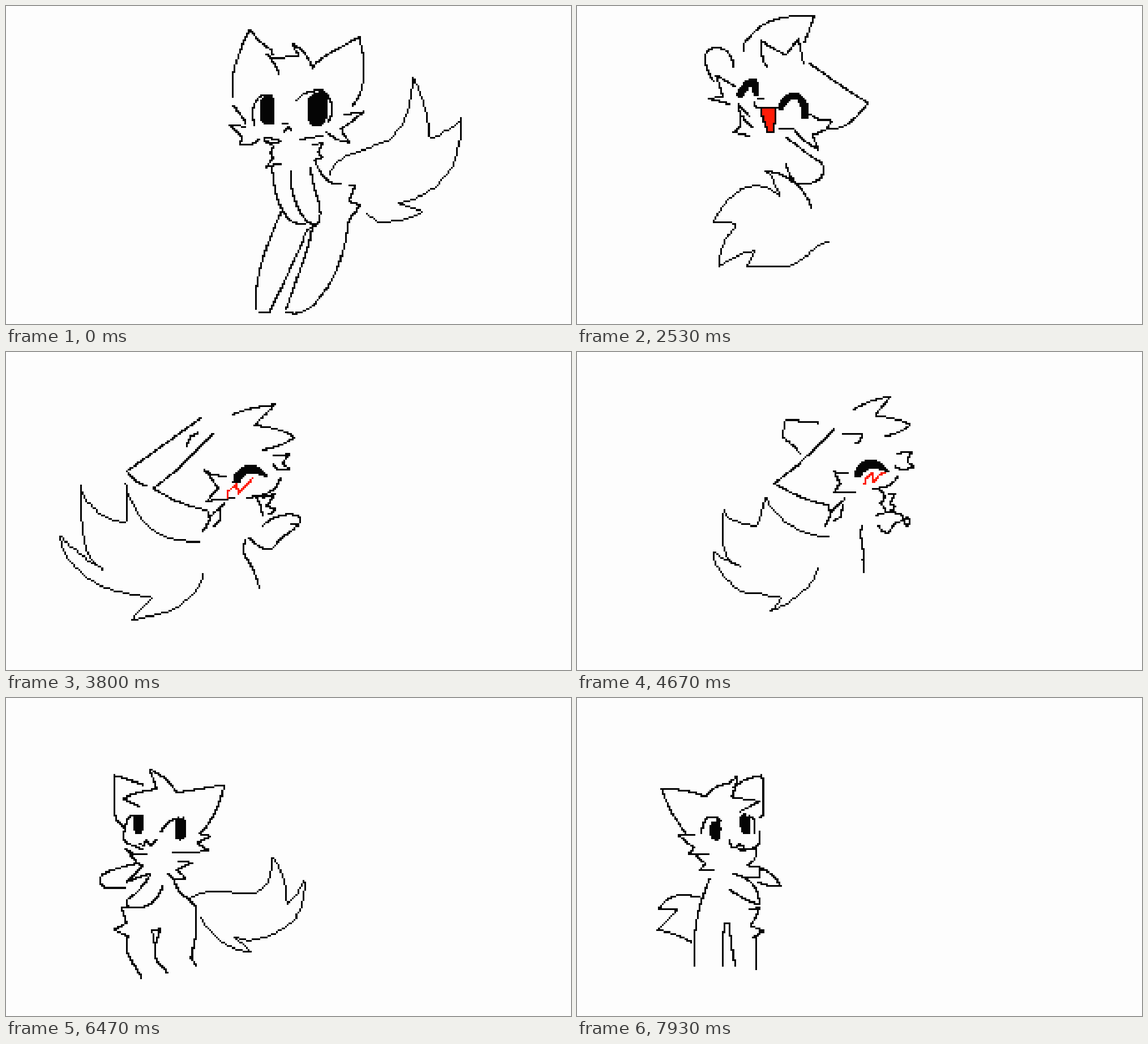
Recreate the animation shown at these times as an HTML page with a canvas. Size 998x561 px, loop 8 s.

```html
<!DOCTYPE html>
<html lang="en">
<head>
<meta charset="utf-8">
<title>Dancing cat</title>
<style>
html, body { margin: 0; width: 100%; height: 100%; overflow: hidden; background: #fdfdfd; }
canvas { display: block; width: 100vw; height: 100vh; image-rendering: pixelated; }
</style>
</head>
<body>
<canvas id="stage" width="320" height="180"></canvas>
<script>
const ctx = document.getElementById('stage').getContext('2d');
const PIXEL = 998 / 320, STEPS = 120, LOOP = 8000, SAMPLES = 160;
const BLACK = '#050505', RED = '#ff1c08', PINK = '#ffaab0';

// Strokes are split by ";". "~" marks a curve control point.
// Prefix: # black fill, r red line, R outlined red fill, p pink fill.
const watching = {
  earL: '402,162 401,125 ~407,85 431,42 447,62 468,77 471,86;402,176 424,206',
  earR: '542,110 548,100 572,83 624,55 632,92 632,125 ~628,158 613,175',
  hair: '460,86 467,91 514,90 516,86 506,67 ~532,80 542,110;462,86 474,101 482,119',
  cheekL: '424,213 394,210 409,223 417,231 412,246 431,246 447,236',
  cheekR: '597,192 632,187 606,207 592,217 596,227 608,241 585,236 567,224',
  whiskers: '457,231 485,238;519,236 560,228',
  eyeL: '439,209 434,190 ~440,158 459,156 470,156;#458,161 470,161 474,168 474,196 471,207 458,208 450,200 450,170',
  eyeR: '514,166 526,154 550,148 563,150 574,170 574,195 568,204;#545,154 560,152 567,160 566,195 560,208 545,212 536,203 536,165',
  mouth: '492,222 499,215 504,219;489,207 497,207',
  chest: '457,237 472,247 467,260 473,268 466,276 459,284 485,278;541,245 560,242 552,258 559,268 544,272;459,240 482,243',
  arms: '470,284 ~474,340 490,362 ~500,382 515,384 528,384;503,292 ~502,335 524,371 ~535,385 545,387;538,285 ~542,320 552,345 ~560,375 548,386 540,390',
  body: '545,272 ~560,308 575,312 592,314',
  hip: '606,315 617,318 609,336 606,345 626,351 608,375',
  legs: '487,362 ~450,440 442,500 442,535;449,540 465,540 ~500,470 524,416 ~528,395 540,391;541,391 535,420 ~515,480 495,535;495,542 512,543 ~535,538 545,525 ~590,480 603,395 606,376',
  tail: '572,297 576,285 600,265 ~670,240 678,235 ~715,205 719,127 ~745,175 748,233 ~780,225 803,199 ~805,240 790,280 ~760,335 693,348 737,363 ~700,382 658,382 638,368'
};
const winking = {
  earL: '290,190 274,180 ~240,140 240,88 245,86 247,90 346,90',
  earR: '395,86 410,82 518,67 ~516,115 500,148 ~492,162 482,166',
  hair: '346,90 403,44 399,80 395,86;442,80 ~436,108 414,114',
  cheekL: '311,205 284,207 309,222 298,244 325,229',
  cheekR: '455,170 488,161 466,191 487,206 438,210',
  whiskers: '340,222 362,226;411,215 440,208;342,229 374,235;413,224 438,211',
  eyeL: '#316,192 322,204 338,208 352,205 361,192 356,208 340,213 324,211',
  eyeR: '428,160 462,149;#402,170 412,165 432,160 432,195 420,201 408,196 402,186;446,160 446,184',
  mouth: '366,211 370,218 378,217 384,212 390,219 398,213;392,198 400,198',
  chest: '343,232 354,245 362,256 344,271 374,267;438,211 440,225 430,239 441,243 453,250 417,252',
  arms: '378,286 ~420,345 440,366 452,367 457,353;420,276 ~445,330 457,353;447,276 ~462,305 461,350',
  hip: '371,346 348,325 337,316 343,335 353,360 325,382 353,389',
  legs: '347,391 ~340,420 340,445 ~347,500 360,535 380,552;397,550 402,392 424,375;407,392 410,460 ~416,520 433,546;456,402 460,470 464,546 457,547',
  tail: '326,391 ~260,395 240,412 ~220,428 198,451 ~220,465 248,471 236,485 236,521 ~270,505 288,502 299,518 ~310,490 338,452'
};
const laughing = {
  earL: '294,79 296,66 ~320,30 360,21 ~385,16 419,17 402,65',
  earR: '410,101 480,150 514,171 ~490,205 465,215 443,216',
  hair: '335,107 328,95 325,62 369,87 391,58 398,90 400,101',
  cheekL: '278,141 246,122 257,160 233,164 271,173',
  cheekR: '411,191 425,200 450,203 440,218 416,228 426,253 ~400,240 384,218 358,216',
  whiskers: '284,173 304,195;292,195 310,215',
  eyeL: '#282,158 ~298,128 312,128 ~322,135 321,158 313,157 ~310,138 305,140 290,161',
  eyeR: '#354,180 ~365,155 388,153 ~410,165 408,198 398,198 ~400,170 385,162 ~370,165 361,184',
  mouth: '313,169 316,178 345,178;321,163 329,163;R324,180 350,180 351,195 347,222 336,222 329,200',
  chest: '284,176 290,195 290,210 277,223 304,229',
  arms: '370,231 ~410,265 432,277 ~440,290 430,304 ~420,316 386,312 ~372,295 370,278;241,132 ~222,105 227,85 ~240,65 262,78 ~275,88 277,107',
  body: '332,291 ~370,295 395,322 ~410,340 413,357',
  tail: '332,291 345,302 357,334 ~330,310 295,321 ~255,345 242,381 278,384 280,390 ~250,420 251,460 ~280,438 314,432 301,460 375,460 ~400,447 420,428 ~432,416 445,416'
};
const leaning = {
  earL: '344,117 214,210 ~225,230 249,236;260,241 300,210 366,145',
  earR: '319,167 326,150 339,143',
  hair: '400,111 ~430,97 475,93 438,130 ~480,132 510,151 ~485,167 453,173',
  cheekL: '388,220 365,217 351,208 375,240 355,263 390,259 405,256',
  cheekR: '472,184 500,180 488,197 502,207 480,208 472,198',
  whiskers: '425,257 450,254 ~480,245 485,222',
  eyeR: '#402,230 404,218 ~420,195 440,202 ~452,208 461,220 440,213 ~422,210 412,228',
  blush: 'r391,258 391,248 408,232 409,250 436,222',
  chest: '441,255 450,272 453,287;455,256 475,251 460,272 475,277 470,284 462,286',
  arms: '453,308 ~468,290 500,286 ~525,288 518,302 ~505,318 490,325 470,348 ~450,350 429,328;505,304 512,304',
  body: '422,332 418,353 ~440,385 447,416',
  hip: '260,241 ~310,272 355,279 358,293 385,268;348,317 360,296;380,280 378,298 366,308',
  tail: '342,334 ~275,338 240,295 ~212,260 212,230 214,303 ~140,285 131,234 ~133,360 155,370 172,384 ~130,360 95,323 ~95,360 140,395 ~190,430 260,432 222,472 ~310,462 340,415 349,390'
};
const waving = {
  earL: '255,184 ~238,140 240,110 242,67 ~295,90 318,100 326,112 328,130',
  earR: '414,151 ~450,172 491,185 ~470,228 439,236',
  hair: '328,130 ~355,108 382,97 363,132 390,133 419,137 409,147 388,157',
  cheekL: '322,250 320,263 304,268 328,278;328,248 340,262 346,270',
  cheekR: '414,217 436,211 430,229 442,247 405,255',
  whiskers: '376,262 394,260',
  eyeL: '#296,208 318,219 332,229 318,236 322,228',
  eyeR: '403,188 416,210;#376,192 390,181 402,188 406,205 405,228 393,230 378,215',
  blush: 'r394,238 404,226 406,240 413,231 417,243',
  mouth: '362,226 370,226;R363,250 369,238 377,235 376,245 370,254',
  chest: '383,268 394,280 398,290 370,296 390,316;398,290 398,318',
  arms: '347,304 350,320 364,333 361,319 398,319;398,319 ~415,322 414,340 ~412,355 400,357 ~384,352 382,335 ~385,320 398,319;289,288 ~260,272 242,250 242,222 250,195 262,183 282,183 290,200 ~310,235 322,250',
  pads: 'p254,217 260,211 270,211 277,220 275,235 263,238 253,232;p252,196 261,194 264,203 259,210 251,205;p273,199 280,199 285,208 279,213 273,208;p241,215 248,214 250,222 244,225',
  body: '329,309 330,335 ~320,360 305,367 295,388',
  legs: '276,412 ~262,460 261,525;261,532 270,541;278,545 288,546 ~300,520 305,480 ~320,435 334,417 348,416 ~366,440 366,480 367,533 375,542 ~405,520 407,480 407,400 398,360',
  tail: '302,362 ~260,340 215,358 ~155,385 148,435 152,467 170,452 179,435 170,452 ~165,480 185,505 210,518 209,490 254,498 ~240,480 239,455 ~240,430 251,418'
};
const standing = {
  earL: '211,230 ~192,220 192,195 193,137 ~220,145 242,153',
  earR: '302,167 345,160 386,153 ~375,205 343,240',
  hair: '237,193 208,178 ~230,165 267,161 253,125 ~285,140 302,167',
  cheekL: '206,250 215,256 242,268',
  cheekR: '343,240 361,244 337,256 358,269 325,274 295,273',
  whiskers: '211,267 225,275 249,277',
  eyeL: '206,250 ~212,212 222,206 240,206;#228,208 240,206 243,215 239,238 229,238 226,225',
  eyeR: '273,237 ~285,215 305,212;#302,215 313,212 318,225 316,245 308,250 301,247',
  mouth: '236,257 243,260 248,252 256,260 266,251',
  chest: '217,272 230,290 241,296 212,325 238,315;286,309 296,320 318,318 302,303 328,291 305,287',
  arms: '230,292 ~180,305 170,312 ~162,325 172,334 ~190,338 209,334;238,315 256,309 ~240,340 213,357 ~212,372 235,371 ~265,365 277,333',
  body: '297,320 ~300,342 323,355 336,370',
  hip: '217,371 203,368 213,397 191,409 218,422',
  legs: '214,422 214,450 ~225,470 240,493;258,410 273,408 263,437 258,410;264,437 264,460 284,484;336,370 335,420 327,460 335,471',
  tail: '323,355 ~355,335 400,343 ~470,360 471,280 ~495,310 496,364 ~515,350 527,321 ~530,360 510,390 ~475,425 425,428 402,421 433,448 ~395,445 375,425 ~350,402 346,389'
};
const turned = {
  earL: '192,238 ~165,205 149,160 ~190,160 227,174',
  earR: '276,157 ~300,140 327,137 330,175 329,205 324,212',
  hair: '227,174 ~245,152 270,150 283,138 280,155 274,175 322,182 290,200',
  cheekL: '206,241 180,243 206,264 197,277 233,276',
  cheekR: '322,235 324,255 315,264 290,270',
  whiskers: '285,268 318,268',
  eyeL: '221,238 ~220,215 235,210 247,211 255,218;#238,222 250,218 253,232 249,250 239,249 235,236',
  eyeR: '303,207 313,215 312,240;#288,210 297,205 303,215 304,238 295,240 289,225',
  mouth: '270,250 273,264 281,264 287,258 296,263',
  chest: '212,280 227,292 218,304 243,305;318,268 314,285 301,296 325,300 322,315 293,315',
  arms: '318,297 ~350,310 359,332 ~340,335 320,325;275,310 ~320,320 322,362 ~310,365 270,339',
  body: '234,320 ~212,370 208,420 208,471',
  hip: '304,373 323,370 314,390 306,402 330,411 310,423',
  legs: '258,474 258,425 260,399 270,399 ~272,440 280,474;318,420 318,480',
  tail: '218,351 180,347 ~155,355 144,373 178,373 143,409 ~190,420 202,432'
};

// from/to: steps held; rest: step at which sway is zero; arc: detour on the way out
const scenes = [
  { pose: watching, from: 0, to: 0, rest: 0, sway: .1, bob: 0, arc: [-170, -25] },
  { pose: winking, from: 13, to: 26, rest: 17, sway: .3, bob: 0, arc: [0, 0] },
  { pose: laughing, from: 34, to: 40, rest: 38, sway: .1, bob: 4, arc: [90, 10] },
  { pose: leaning, from: 51, to: 65, rest: 57, sway: .16, bob: 6, arc: [120, -20] },
  { pose: waving, from: 77, to: 89, rest: 82, sway: .45, bob: 4, arc: [0, 15] },
  { pose: standing, from: 94, to: 115, rest: 97, sway: .1, bob: 4, arc: [0, 0] },
  { pose: turned, from: 119, to: 120, rest: 119, sway: .1, bob: 0, arc: [0, 0] }
];

const mix = (a, b, k) => a + (b - a) * k;
const mixPt = (p, q, k) => [mix(p[0], q[0], k), mix(p[1], q[1], k)];

function flatten(text) {
  const line = [];
  let control = null;
  for (const word of text.split(' ')) {
    const point = word.replace('~', '').split(',').map(Number);
    if (word[0] === '~') { control = point; continue; }
    if (control) {
      const start = line[line.length - 1];
      for (let i = 1; i < 12; i++) {
        const k = i / 12;
        line.push(mixPt(mixPt(start, control, k), mixPt(control, point, k), k));
      }
    }
    line.push(point);
    control = null;
  }
  return line;
}

// Even spacing lets strokes of different poses blend point by point.
function resample(line) {
  const reach = [0];
  for (let i = 1; i < line.length; i++)
    reach.push(reach[i - 1] + Math.hypot(line[i][0] - line[i - 1][0], line[i][1] - line[i - 1][1]));
  const total = reach[reach.length - 1], out = [];
  for (let n = 0, i = 1; n < SAMPLES; n++) {
    const d = total * n / (SAMPLES - 1);
    while (i < line.length - 1 && reach[i] < d) i++;
    out.push(mixPt(line[i - 1], line[i], Math.min(1, (d - reach[i - 1]) / (reach[i] - reach[i - 1]))));
  }
  return out;
}

function parseStroke(text) {
  const style = /[#rRp]/.test(text[0]) ? text[0] : '';
  const line = flatten(text.slice(style.length));
  if (style && style !== 'r') line.push(line[0]);
  return { style, points: resample(line) };
}

for (const scene of scenes) {
  scene.parts = {};
  for (const name in scene.pose) scene.parts[name] = scene.pose[name].split(';').map(parseStroke);
  scene.anchor = scene.parts.hair[0].points[0];
  scene.pivot = scene.parts.tail[0].points[0];
}

function swayed(scene, name, points, step) {
  const wave = Math.sin((step - scene.rest) * Math.PI / 6);
  const angle = name === 'tail' ? scene.sway * wave : 0;
  const c = Math.cos(angle), s = Math.sin(angle), [px, py] = scene.pivot;
  return points.map(([x, y]) => [
    px + (x - px) * c - (y - py) * s,
    py + (x - px) * s + (y - py) * c + scene.bob * wave
  ]);
}

const shift = (points, dx, dy) => points.map(([x, y]) => [x + dx, y + dy]);

function drawLine(points, color) {
  ctx.fillStyle = color;
  const cells = points.map(([x, y]) => [Math.floor(x / PIXEL), Math.floor(y / PIXEL)]);
  for (let i = 1; i < cells.length; i++) {
    const [a, b] = [cells[i - 1], cells[i]];
    const n = Math.max(Math.abs(b[0] - a[0]), Math.abs(b[1] - a[1]), 1);
    for (let j = 0; j <= n; j++) {
      const [x, y] = mixPt(a, b, j / n);
      ctx.fillRect(Math.round(x), Math.round(y), 1, 1);
    }
  }
}

function fillShape(points, color) {
  ctx.fillStyle = color;
  const ys = points.map(p => p[1] / PIXEL);
  for (let y = Math.floor(Math.min(...ys)); y <= Math.max(...ys); y++) {
    const mid = (y + .5) * PIXEL, hits = [];
    for (let i = 1; i < points.length; i++) {
      const a = points[i - 1], b = points[i];
      if ((a[1] <= mid) !== (b[1] <= mid))
        hits.push(mix(a[0], b[0], (mid - a[1]) / (b[1] - a[1])) / PIXEL);
    }
    hits.sort((a, b) => a - b);
    for (let i = 0; i + 1 < hits.length; i += 2) {
      const left = Math.round(hits[i]);
      ctx.fillRect(left, y, Math.round(hits[i + 1]) - left, 1);
    }
  }
}

function drawStroke(style, points) {
  const fill = { '#': BLACK, R: RED, p: PINK }[style];
  if (fill) fillShape(points, fill);
  drawLine(points, style === 'r' ? RED : style === 'p' ? PINK : BLACK);
}

function drawScene(step) {
  ctx.fillStyle = '#fdfdfd';
  ctx.fillRect(0, 0, 320, 180);
  let at = scenes.length - 1;
  while (scenes[at].from > step) at--;
  const a = scenes[at], b = scenes[at + 1] || a;
  const raw = step <= a.to ? 0 : (step - a.to) / (b.from - a.to);
  const k = raw * raw * (3 - 2 * raw), lift = Math.sin(Math.PI * raw);
  const dx = a.arc[0] * lift, dy = a.arc[1] * lift;
  const gap = [b.anchor[0] - a.anchor[0], b.anchor[1] - a.anchor[1]];

  for (const name of new Set([...Object.keys(a.parts), ...Object.keys(b.parts)])) {
    const from = a.parts[name] || [], to = b.parts[name] || [];
    for (let i = 0; i < Math.max(from.length, to.length); i++) {
      const p = from[i], q = to[i];
      const start = p && swayed(a, name, p.points, step);
      const end = q && swayed(b, name, q.points, step);
      if (p && q && p.style === q.style) {
        drawStroke(p.style, shift(start.map((pt, n) => mixPt(pt, end[n], k)), dx, dy));
      } else if (k < .5) {
        if (p) drawStroke(p.style, shift(start, gap[0] * k + dx, gap[1] * k + dy));
      } else if (q) {
        drawStroke(q.style, shift(end, gap[0] * (k - 1) + dx, gap[1] * (k - 1) + dy));
      }
    }
  }
}

const began = performance.now();
let shown = -1;
function tick() {
  const time = (performance.now() - began) % LOOP;
  const step = Math.floor((time + 5) * STEPS / LOOP) % STEPS;
  if (step !== shown) drawScene(shown = step);
  requestAnimationFrame(tick);
}
tick();
</script>
</body>
</html>
```
